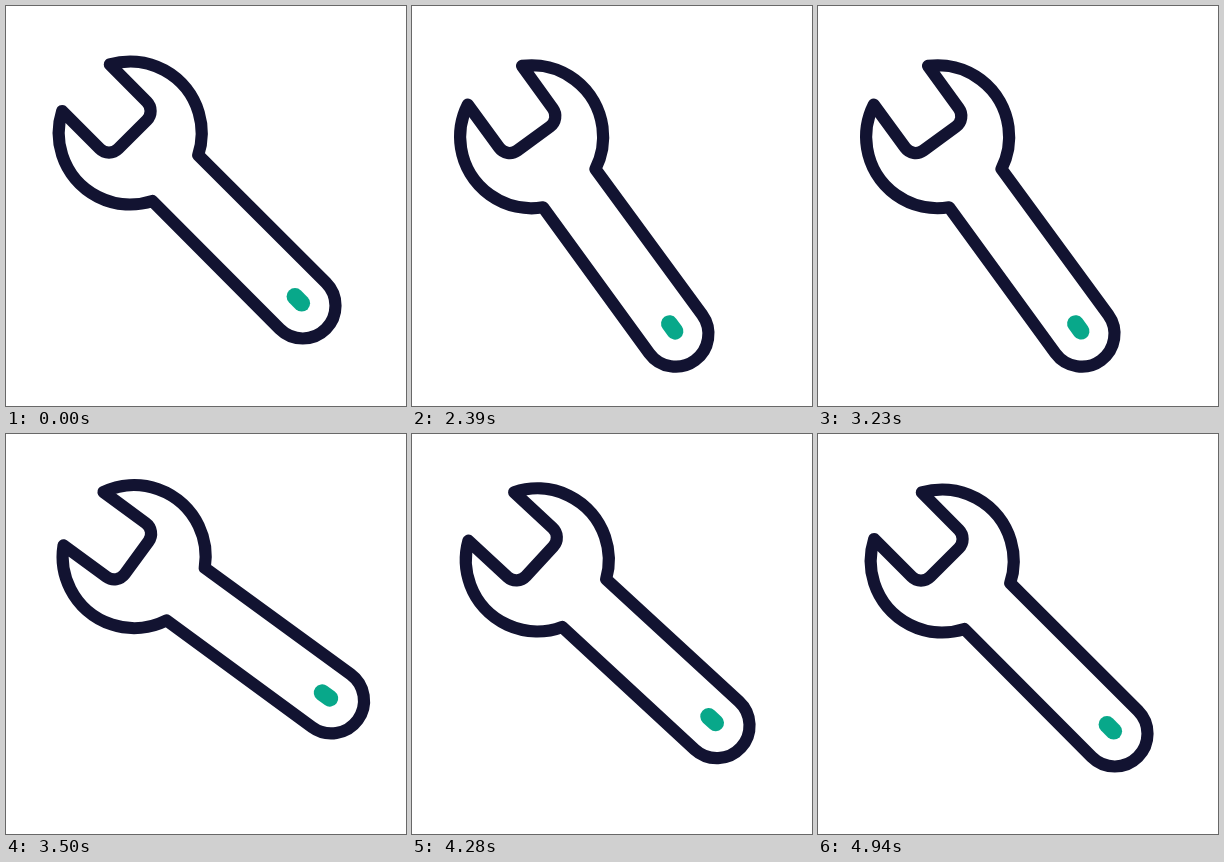
An HTML page with a canvas that plays this animation: 400x400 px, repeating every 4970 ms.

```html
<!DOCTYPE html>
<html lang="en">
<head>
<meta charset="utf-8">
<title>Wrench</title>
<style>
  html, body { margin: 0; width: 100%; height: 100%; overflow: hidden; background: #fff; }
  canvas { display: block; width: 400px; height: 400px; }
</style>
</head>
<body>
<canvas id="stage" width="400" height="400"></canvas>
<script>
const ctx = document.getElementById('stage').getContext('2d');
const LOOP = 4970, REST = 2000, STEP = 30;
const INK = '#121331', GREEN = '#08a88a';
const PIVOT = [97.5, 99.3];

// Swing keys: step, angle in degrees, ease-in and ease-out handles of the move that follows
const KEYS = [
  [0, 0, 0.33, 0.67],
  [7.3, 22, 0.33, 0.51],
  [22, -10.1, 0.5, 0.66],
  [35.8, 22, 0.33, 0.15],
  [55, -10.1, 0.34, 0.65],
  [69.6, 22, 0.33, 0.67],
  [79, -10.1, 0.33, 0.67],
  [98, 0, 0.33, 0.67]
];

// Bezier easing with flat ends: solve x(s) = p by bisection, return y(s)
function ease(p, x1, x2) {
  let lo = 0, hi = 1, s = p;
  for (let i = 0; i < 24; i++) {
    s = (lo + hi) / 2;
    const q = 1 - s;
    const x = 3 * s * q * q * x1 + 3 * s * s * q * x2 + s * s * s;
    if (x < p) lo = s; else hi = s;
  }
  return s * s * (3 - 2 * s);
}

function angleAt(step) {
  for (let i = 1; i < KEYS.length; i++) {
    const [k0, a0, x1, x2] = KEYS[i - 1];
    const [k1, a1] = KEYS[i];
    if (step < k1) return a0 + (a1 - a0) * ease((step - k0) / (k1 - k0), x1, x2);
  }
  return 0;
}

function wrenchPath() {
  const cx = 124.2, cy = 127, r = 71.5;
  const dir = (x, y) => Math.atan2(y - cy, x - cx);
  const path = new Path2D();
  path.arc(cx, cy, r, dir(104, 59), dir(192.8, 149.3));
  path.arc(296.8, 299.8, 32.7, -Math.PI / 4, Math.PI * 3 / 4);
  path.arc(cx, cy, r, dir(146.5, 195.5), dir(56, 105));
  path.arcTo(103, 152, 150, 105, 13);
  path.arcTo(150, 105, 104, 59, 13);
  path.closePath();
  return path;
}

const wrench = wrenchPath();
const hole = new Path2D('M289 290.5L295.7 297.2');

function stroke(path, color, width) {
  ctx.strokeStyle = color;
  ctx.lineWidth = width;
  ctx.stroke(path);
}

function draw(ms) {
  const step = Math.max(0, Math.floor((ms - REST) / STEP));
  ctx.setTransform(1, 0, 0, 1, 0, 0);
  ctx.fillStyle = '#fff';
  ctx.fillRect(0, 0, 400, 400);
  ctx.translate(PIVOT[0], PIVOT[1]);
  ctx.rotate(angleAt(step) * Math.PI / 180);
  ctx.translate(-PIVOT[0], -PIVOT[1]);
  ctx.lineCap = ctx.lineJoin = 'round';
  stroke(wrench, INK, 12.2);
  stroke(hole, GREEN, 16.8);
}

const start = performance.now();
function tick() {
  draw((performance.now() - start) % LOOP);
  requestAnimationFrame(tick);
}
tick();
</script>
</body>
</html>
```
